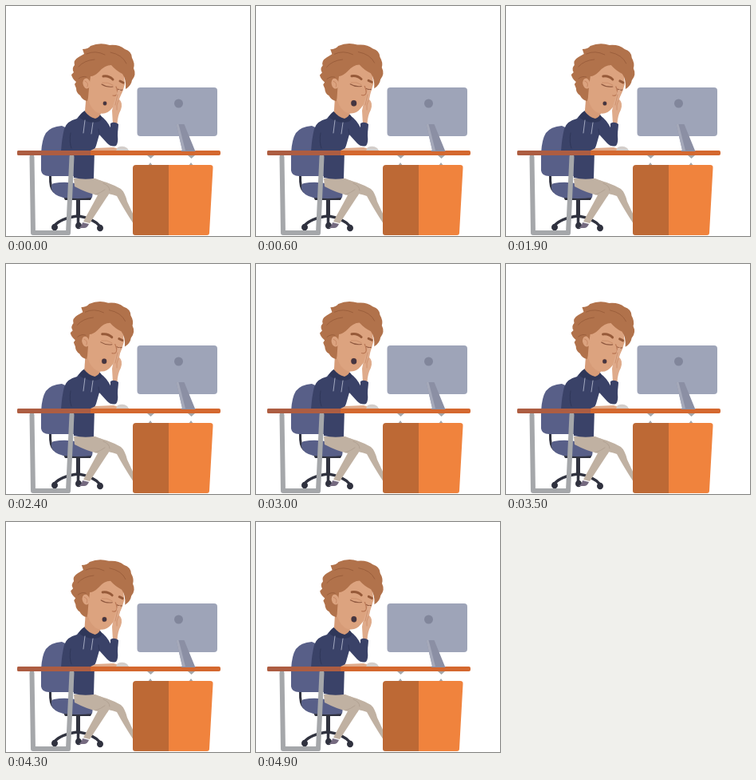
An HTML page with a canvas that plays this animation: 306 by 288 pixels, repeating every 5 s.

```html
<!DOCTYPE html>
<html lang="en">
<head>
<meta charset="utf-8">
<title>Yawning at the desk</title>
<style>
html, body { margin: 0; width: 100%; height: 100%; overflow: hidden; background: #fff; }
canvas { display: block; width: 306px; height: 288px; }
</style>
</head>
<body>
<canvas id="stage"></canvas>
<script>
const W = 306, H = 288, LOOP = 5000, STEP = 100;
const canvas = document.getElementById('stage');
const ratio = window.devicePixelRatio || 1;
canvas.width = W * ratio;
canvas.height = H * ratio;
const ctx = canvas.getContext('2d');
ctx.scale(ratio, ratio);
ctx.lineCap = ctx.lineJoin = 'round';

const C = {
  navy: '#3a4268', navyDark: '#2f3759', chair: '#585f88', chairDark: '#474f73',
  dark: '#30323f', skin: '#dca37f', shade: '#c98a66', light: '#dfab8b',
  hair: '#b1724b', hairDark: '#965a39', pants: '#c0b1a2', pantsDark: '#b1a192',
  steel: '#a5a7aa', screen: '#9ea4b8', wood: '#bd6935', orange: '#f0833d'
};

// Times in ms and how far the yawn has opened
const yawn = [[0, 0], [650, 1], [1750, .05], [2900, 1], [3750, 0], [4900, .88], [5000, .88]];

function openness(t) {
  const i = yawn.findIndex(k => t < k[0]);
  const [t0, a] = yawn[i - 1], [t1, b] = yawn[i];
  return a + (b - a) * (1 - Math.cos(Math.PI * (t - t0) / (t1 - t0))) / 2;
}

function fill(color, d) {
  ctx.fillStyle = color;
  ctx.fill(new Path2D(d));
}

function line(color, width, d) {
  ctx.strokeStyle = color;
  ctx.lineWidth = width;
  ctx.stroke(new Path2D(d));
}

function oval(color, x, y, rx, ry = rx, turn = 0) {
  ctx.fillStyle = color;
  ctx.beginPath();
  ctx.ellipse(x, y, rx, ry, turn, 0, 7);
  ctx.fill();
}

function box(color, x, y, w, h, r) {
  ctx.fillStyle = color;
  ctx.beginPath();
  ctx.roundRect(x, y, w, h, r);
  ctx.fill();
}

function drawChair() {
  line(C.dark, 3, 'M55.5 213Q55 228 60 232L72 238');
  line(C.dark, 5, 'M90.5 243V262');
  line(C.dark, 3.5, 'M90 263Q68 266 61 275M91 263Q110 266 118 276M90.5 263V273');
  for (const [x, y] of [[61, 277], [91, 275], [118, 278]]) oval(C.dark, x, y, 4, 4.3);
  fill(C.dark, 'M72 239H108L106 243H74Z');
  fill(C.chair, 'M70 150Q56 151 50 159Q45 167 44 184V206Q45 213 54 213H88L92 160Z');
  fill(C.chair, 'M60 222Q82 218 105 227Q110 231 108 240Q90 242 72 240Q59 237 57 229Q56 223 60 222Z');
}

function drawLegs() {
  fill(C.pants, 'M110 217Q126 219 144 229Q149 233 152 245L160 262V273Q147 253 139 238Q131 235 115 233Z');
  fill(C.pants, 'M85 216H112Q128 221 130 229Q131 234 126 240L105 272L97 270L115 237Q101 234 86 226Z');
  line(C.pantsDark, 1, 'M112 236Q119 234 124 230M122 222Q130 225 130 231');
  fill('#756a80', 'M96 271L104 273Q102 278 98 278H91Q95 276 96 271Z');
}

function drawBody() {
  fill(C.navy, 'M85 181H111L110 216Q97 218 85 215Z');
  fill(C.navy, 'M99 132Q93 135 89 141Q76 144 73 154Q70 166 69 182H110L113 175L117 161L127 172Q132 177 138 175Q141 172 140 162L140.5 148H132L132 154Q126 142 118 137Z');
  line(C.navyDark, 1, 'M81 159Q79 170 82 178M117 161L116 154');
  fill(C.navyDark, 'M99 131Q92 135 92 140Q104 148 116 145Q123 141 118 136Z');
  line('#a3a9c0', 1, 'M99 143L97 159M109 146L107 160');
}

function drawHead(p) {
  ctx.save();
  ctx.translate(110 - p, 138);
  ctx.rotate(-.021 * p);
  ctx.translate(-110, -138);
  fill('#d69b77', 'M101 107L99 132Q104 139 112 141Q118 139 120 132Z');
  fill(C.skin, 'M103 83Q99 101 103 117Q107 131 116 134Q126 137 133 128Q145 115 149 98L147 75Q131 60 113 74Z');
  fill(C.hair, 'M102 119Q96 118 93 112Q88 109 88 103L86 98L88 95Q83 91 82 86L85 83Q82 78 86 74Q84 68 91 64L98 60L96 54Q103 54 106 50Q118 45 130 49Q142 48 149 54Q158 57 158 65Q162 72 160 78Q164 86 158 93Q157 100 150 104Q151 92 146 85Q138 81 132 74Q124 74 117 82Q111 88 106 88Q104 100 103 115Z');
  line(C.hairDark, .8, 'M91 76Q98 68 111 67M101 60Q112 55 124 61M131 58Q146 61 151 72M91 91Q96 87 101 89');
  oval(C.skin, 101, 97, 4.5, 6.5, -.2);
  line(C.shade, 1, 'M99 94Q104 96 102 101');
  line(C.hairDark, 3, 'M122 88Q129 87 134 92M143 94L147 96');
  line('#8f583f', 1.1, 'M120 98Q126 102 134 101M140 104Q143 106 146 105');
  line(C.shade, .8, 'M121 96Q128 95 134 99');
  line('#b97654', 1.2, 'M138 101Q141 108 139 111Q137 113 134 112');
  oval(C.shade, 124, 122, 2.8 + p, 2.9 + 1.2 * p);
  oval('#453641', 124, 122, 2.3 + 1.2 * p, 2.4 + 1.4 * p);
  ctx.restore();
}

function drawHand() {
  fill(C.light, 'M134 148L133 131Q134 123 137 116L140 106Q143 103 144 107L142 117Q147 121 144 130Q140 137 139.5 148Z');
  line(C.shade, .8, 'M137 124L140 111M141 118Q138 124 139 130');
  fill(C.navy, 'M131 147Q136 144 141 148L140 157H131Z');
}

function drawDesk() {
  fill(C.light, 'M106 181L112 178L135 177L144 180V182H106Z');
  fill('#d3cecb', 'M138 181L140 177Q147 174 152 178L155 182H138Z');

  line(C.steel, 6, 'M32.5 189L34 284H78L82.5 189');
  fill(C.steel, 'M177 187H186L181.5 191ZM228 187H237L232.5 191ZM178 200L181 196L184 200ZM229 200L232 196L235 200Z');
  fill(C.wood, 'M159 203Q159 199 163 199H204V287H162Q159 287 159 284Z');
  fill(C.orange, 'M204 199H256Q260 199 259.5 203L255 284Q255 287 252 287H204Z');

  box('#d4682f', 14, 181, 255, 6, 2);
  box('#ad5d42', 14, 181, 92, 6, [2, 0, 0, 2]);
}

function drawMonitor() {
  box(C.screen, 164.5, 102, 100.5, 61, 4);
  fill('#8b8fa4', 'M213.5 148H223.5L237 181L238 182H219L221 180Z');
  fill('#a5a9ba', 'M213.5 148H216.5L225 181H221Z');
  oval('#81869b', 216.5, 122, 5.5);
}

function draw(now) {
  const t = Math.floor((now % LOOP) / STEP) * STEP;
  ctx.fillStyle = '#fff';
  ctx.fillRect(0, 0, W, H);
  drawChair();
  drawLegs();
  drawBody();
  drawHead(openness(t));
  drawHand();
  drawDesk();
  drawMonitor();
}

const start = performance.now();
function tick() {
  draw(performance.now() - start);
  requestAnimationFrame(tick);
}
tick();
</script>
</body>
</html>
```
